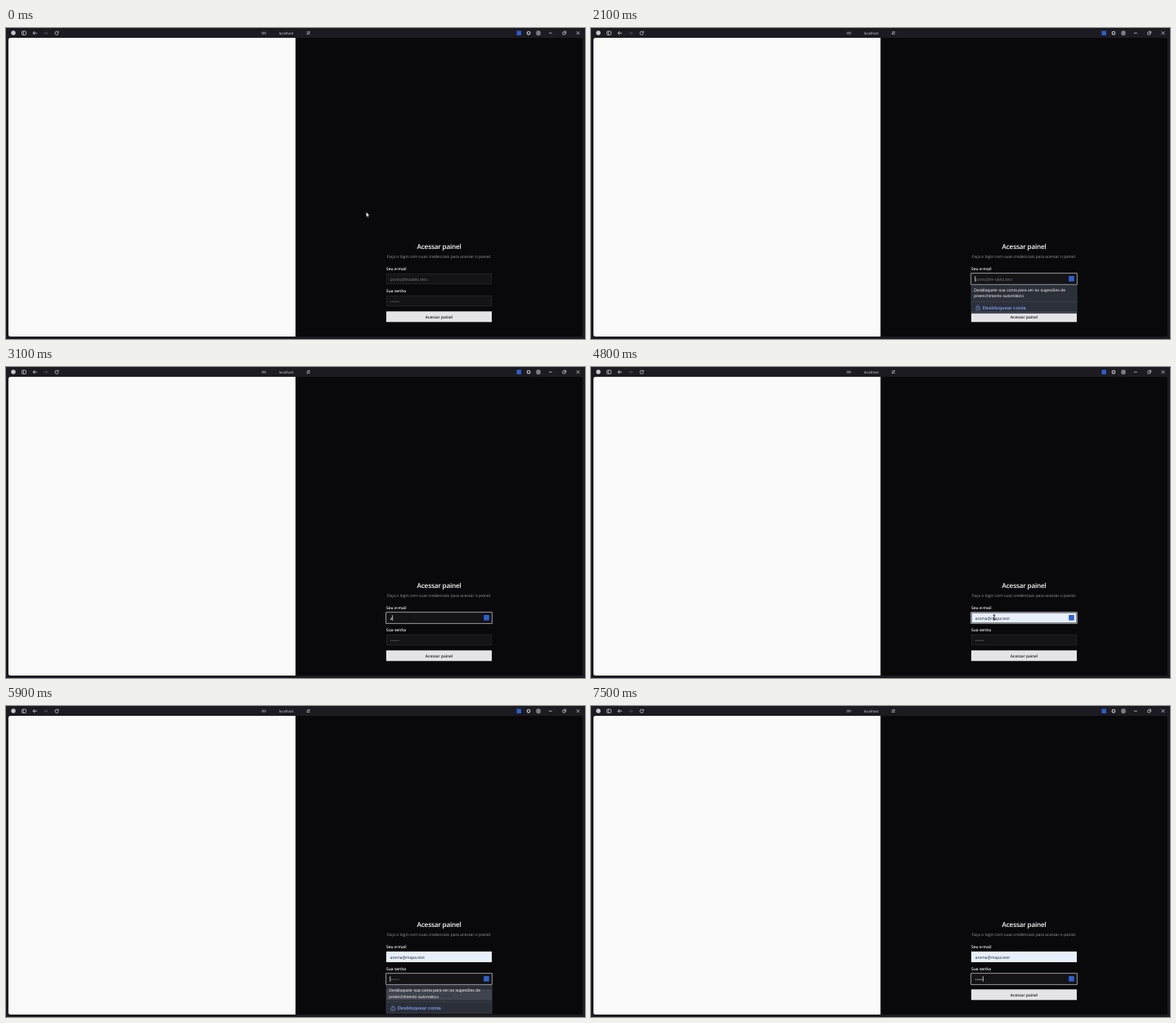
Recreate the animation shown at these times as an HTML page with a canvas. Size 708x380 px, loop 8 s.

```html
<!DOCTYPE html>
<html lang="pt-BR">
<head>
<meta charset="utf-8">
<title>Acessar painel</title>
<style>
  html, body { margin: 0; width: 100%; height: 100%; overflow: hidden; background: #1c1b21; }
  canvas { display: block; }
</style>
</head>
<body>
<canvas id="stage" width="708" height="380"></canvas>
<script>
const ctx = document.getElementById('stage').getContext('2d');
const LOOP = 8000, STEP = 100;
const UI = '"Open Sans", "Noto Sans", sans-serif';
const MENU = '"Liberation Sans", Arial, sans-serif';
const BLUE = '#2f5fd0';
const EMAIL = 'aroma@mapa.test';
const EMAIL_HINT = 'ponto@modelo.test';
const BULLET = '•';
const FIELD = { x: 465, w: 129, h: 13, email: 300, password: 327 };
const EMAIL_KEYS = [3100, 3300, 3500, 3900, 4200];
const PASSWORD_KEYS = [6500, 7000, 7200, 7200, 7500];

const between = (t, a, b) => t >= a && t < b;
const clamp = v => Math.max(0, Math.min(1, v));
const smooth = v => v * v * (3 - 2 * v);
const typed = (t, keys) => keys.filter(k => k <= t).length;

function rect(x, y, w, h, color, radius = 0) {
  ctx.fillStyle = color;
  ctx.beginPath();
  ctx.roundRect(x, y, w, h, radius);
  ctx.fill();
}

function frame(x, y, w, h, color, width = 1, radius = 0) {
  ctx.strokeStyle = color;
  ctx.lineWidth = width;
  ctx.beginPath();
  ctx.roundRect(x, y, w, h, radius);
  ctx.stroke();
}

function lines(color, width, ...paths) {
  ctx.strokeStyle = color;
  ctx.lineWidth = width;
  ctx.beginPath();
  for (const p of paths) {
    ctx.moveTo(p[0], p[1]);
    for (let i = 2; i < p.length; i += 2) ctx.lineTo(p[i], p[i + 1]);
  }
  ctx.stroke();
}

function arc(x, y, r, color, width, from = 0, to = Math.PI * 2) {
  ctx.strokeStyle = color;
  ctx.lineWidth = width;
  ctx.beginPath();
  ctx.arc(x, y, r, from, to);
  ctx.stroke();
}

function text(str, x, y, size, color, { weight = 400, font = UI, align = 'left', spacing = 0 } = {}) {
  ctx.font = `${weight} ${size}px ${font}`;
  ctx.letterSpacing = `${spacing}px`;
  ctx.textAlign = align;
  ctx.fillStyle = color;
  ctx.fillText(str, x, y);
  return ctx.measureText(str).width;
}

function drawToolbar() {
  const ink = '#c9c8cf', dim = '#55545b';
  ctx.fillStyle = ink;
  ctx.beginPath();
  ctx.arc(9, 6, 2.7, 0, Math.PI * 2);
  ctx.fill();
  frame(19.5, 4, 5, 4.4, ink, 0.8, 0.8);
  lines(ink, 0.8, [21.3, 4, 21.3, 8.4]);
  lines(ink, 0.9, [37.8, 6.2, 33, 6.2], [35.2, 4, 33, 6.2, 35.2, 8.4]);
  lines(dim, 0.8, [46, 6.2, 50.6, 6.2], [48.6, 4.1, 50.6, 6.2, 48.6, 8.3]);
  arc(62, 6.3, 2.1, ink, 0.8, 0.1, 5.5);
  lines(ink, 0.8, [64.2, 3.7, 64.2, 5.4, 62.6, 5.4]);
  arc(314.1, 6.2, 1.2, '#96959c', 0.8);
  arc(316.6, 6.2, 1.2, '#96959c', 0.8);
  text('localhost', 342.7, 7.8, 4.3, '#dddce2', { align: 'center' });
  lines(ink, 0.7, [367.6, 5, 371.8, 5], [367.6, 7.3, 371.8, 7.3]);
  rect(370, 4.2, 1.4, 1.5, ink, 0.7);
  rect(368, 6.5, 1.4, 1.5, ink, 0.7);
  rect(624.5, 3.5, 5.4, 5.4, BLUE);
  arc(639, 6.2, 1.8, '#b2b1b8', 1.3);
  frame(649, 4, 4, 4.4, ink, 0.8, 0.6);
  lines(ink, 0.7, [651, 4, 651, 8.4], [649, 6.2, 653, 6.2]);
  lines(ink, 0.8, [663.8, 6.2, 667.8, 6.2]);
  frame(680.8, 5, 3, 3, ink, 0.7);
  lines(ink, 0.7, [682, 4.1, 684.7, 4.1, 684.7, 7]);
  lines(ink, 0.8, [697.6, 4.2, 701.4, 8], [701.4, 4.2, 697.6, 8]);
}

function drawPage() {
  rect(0, 0, 708, 380, '#1c1b21');
  drawToolbar();
  rect(3, 12, 702, 365, '#09090b', 2.5);
  rect(3, 12, 351, 365, '#fafafb', [2.5, 0, 0, 2.5]);
  text('Acessar painel', 529.6, 270.3, 8.2, '#fafafa', { weight: 600, align: 'center', spacing: -0.2 });
  text('Faça o login com suas credenciais para acessar o painel.', 529.5, 281, 4.92, '#9b9ba4', { align: 'center' });
  text('Seu e-mail', 465, 296, 4.9, '#fafafa', { weight: 600 });
  text('Sua senha', 465, 323.2, 4.9, '#fafafa', { weight: 600 });
  rect(465, 346.2, 129, 13, '#e4e4e7');
  text('Acessar painel', 529.5, 354.5, 4.8, '#18181b', { weight: 600, align: 'center' });
}

function drawField(y, { value, hint, focused, caret, fill = 0 }) {
  const { x, w, h } = FIELD;
  rect(x, y, w, h, '#141417');
  frame(x + 0.3, y + 0.3, w - 0.6, h - 0.6, '#2a2a2e', 0.7);
  ctx.globalAlpha = fill;
  rect(x, y, w, h, '#e8f0fe');
  ctx.globalAlpha = 1;
  if (focused) {
    frame(x + 0.2, y + 0.2, w - 0.4, h - 0.4, '#09090b', 0.7);
    frame(x - 0.4, y - 0.4, w + 0.8, h + 0.8, '#a6a6ad', 0.9);
    rect(584.2, y + 3, 6.6, 6.6, BLUE);
  }
  const ink = fill > 0.4 ? '#18181b' : '#fafafa';
  const width = text(value || hint, 469.7, y + 8.5, 4.92, value ? ink : '#83838c');
  if (caret) rect(469.7 + (value ? width : -0.2), y + 3.3, 0.7, 6.4, ink);
}

function drawMenu(top, alpha) {
  ctx.globalAlpha = alpha;
  rect(464.8, top, 129.6, 34.7, '#2f343d');
  frame(465, top + 0.2, 129.2, 34.3, '#3b424e', 0.6);
  lines('#4a515e', 0.5, [465, top + 20.3, 594.4, top + 20.3]);
  const style = { font: MENU };
  text('Desbloqueie sua conta para ver as sugestões de', 468.3, top + 7.9, 5.17, '#ffffff', style);
  text('preenchimento automático', 468.3, top + 15.4, 5.17, '#ffffff', style);
  frame(470.9, top + 27.3, 4.6, 3.4, '#7f9df0', 0.7, 0.7);
  arc(473.2, top + 26.4, 1.3, '#7f9df0', 0.7, Math.PI, 0);
  lines('#7f9df0', 0.6, [473.2, top + 28.4, 473.2, top + 29.5]);
  text('Desbloquear conta', 478.8, top + 29.6, 5.9, '#7f9df0', { weight: 700, font: MENU });
  ctx.globalAlpha = 1;
}

function drawArrow(x, y) {
  const shape = [0, 0, 0, 6.2, 1.4, 5, 2.3, 7, 3.3, 6.5, 2.4, 4.6, 4.3, 4.4];
  ctx.beginPath();
  for (let i = 0; i < shape.length; i += 2) ctx.lineTo(x + shape[i], y + shape[i + 1]);
  ctx.closePath();
  ctx.strokeStyle = '#000';
  ctx.lineWidth = 0.5;
  ctx.fillStyle = '#fff';
  ctx.fill();
  ctx.stroke();
}

function drawBeam(x, y) {
  lines('#0a0a0c', 0.9, [x, y - 2.9, x, y + 2.9],
    [x - 1.3, y - 2.9, x + 1.3, y - 2.9], [x - 1.3, y + 2.9, x + 1.3, y + 2.9]);
}

function drawPointer(t) {
  if (t < 1300) {
    const p = smooth(clamp((t - 600) / 400));
    drawArrow(440.3 + 60.5 * p, 224.7 + 63.3 * p);
  } else if (t < 5300) {
    t < 1400 ? drawBeam(496, 304) : drawBeam(493, 306);
  }
}

// The caret restarts its blink at every focus change or key press.
function caretOn(t, resets) {
  const last = resets.filter(r => r <= t).pop();
  return last !== undefined && (t - last) % 1000 < 500;
}

function draw(t) {
  const emailFocus = between(t, 1800, 5600);
  const passwordFocus = t >= 5600;
  const filled = t >= 4700;
  drawPage();
  drawField(FIELD.email, {
    value: filled ? EMAIL : EMAIL.slice(0, typed(t, EMAIL_KEYS)),
    hint: EMAIL_HINT,
    focused: emailFocus,
    caret: emailFocus && !between(t, 4700, 5000) && caretOn(t, [1800, ...EMAIL_KEYS, 5000]),
    fill: clamp((t - 4600) / 200)
  });
  drawField(FIELD.password, {
    value: BULLET.repeat(typed(t, PASSWORD_KEYS)),
    hint: BULLET.repeat(6),
    focused: passwordFocus,
    caret: passwordFocus && caretOn(t, [5600, ...PASSWORD_KEYS])
  });
  for (const [start, end, top] of [[2100, 3100, 314], [5900, 6500, 341.3]]) {
    if (between(t, start, end)) drawMenu(top, clamp(0.9 + (t - start) / 2000));
  }
  drawPointer(t);
}

ctx.textRendering = 'geometricPrecision';
function tick() {
  const t = performance.now() % LOOP;
  draw(Math.floor(t / STEP) * STEP);
  requestAnimationFrame(tick);
}
tick();
</script>
</body>
</html>
```
